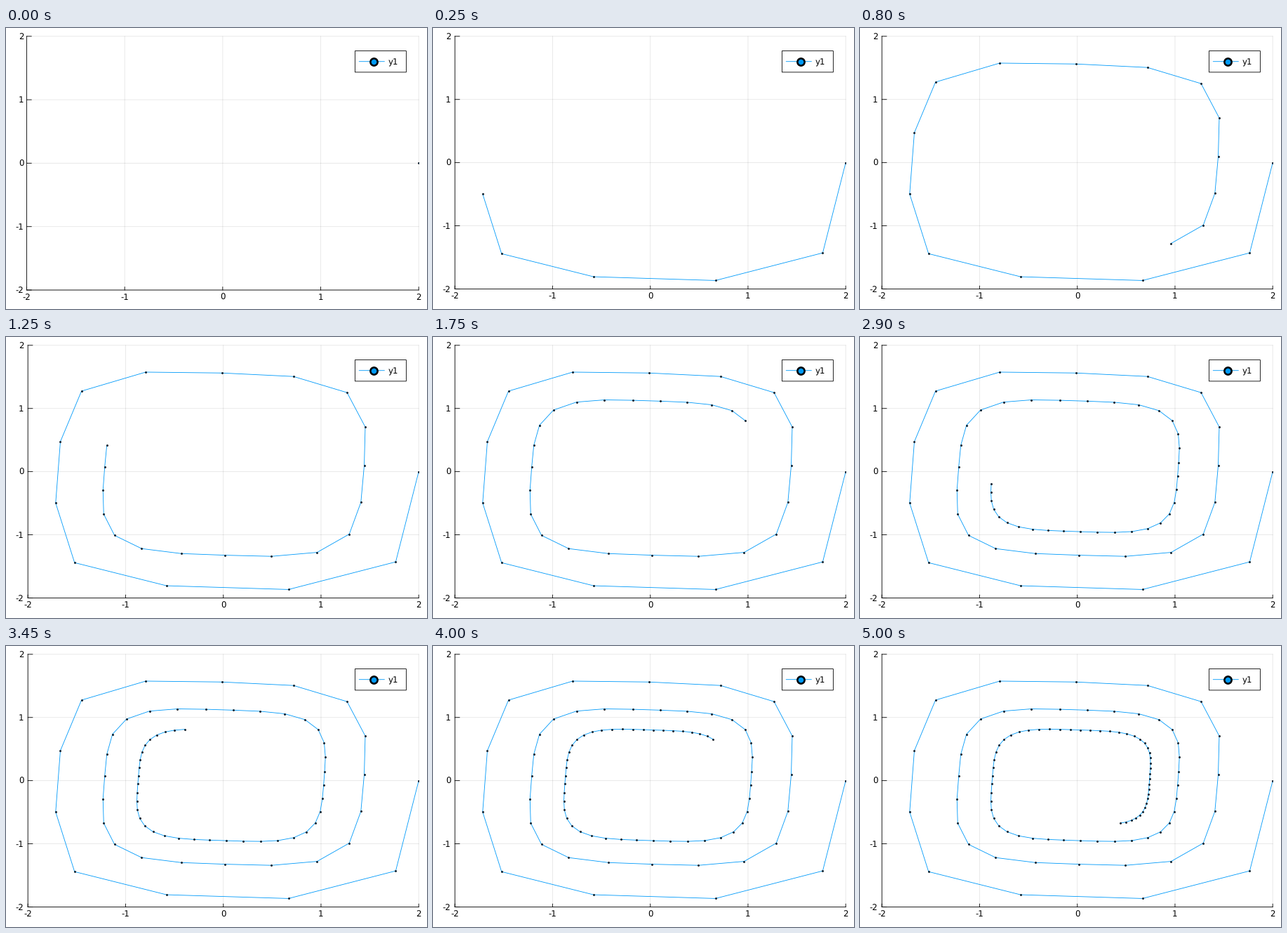
Recreate the animation shown at these times as a matplotlib script. Size 600 by 400 pixels, loop 5050 ms.

```python
import numpy as np
import matplotlib.pyplot as plt
from matplotlib.animation import FuncAnimation
from matplotlib.patches import Rectangle

W, H, DPI = 600, 400, 100
FRAMES, INTERVAL, DT = 101, 50, 0.1
BLUE = "#009AFA"
PX = 72 / DPI  # points per pixel
LW = 0.85
plt.rcParams["path.snap"] = False
plt.rcParams["text.hinting"] = "none"

# Tsit5 Runge-Kutta pair: stages, error weights, dense output
STAGES = [np.array(row) for row in (
    [0.161],
    [-0.008480655492356989, 0.335480655492357],
    [2.8971530571054935, -6.359448489975075, 4.3622954328695815],
    [5.325864828439257, -11.748883564062828, 7.4955393428898365,
     -0.09249506636175525],
    [5.86145544294642, -12.92096931784711, 8.159367898576159,
     -0.071584973281401, -0.028269050394068383],
    [0.09646076681806523, 0.01, 0.4798896504144996, 1.379008574103742,
     -3.290069515436081, 2.324710524099774],
)]
ERROR = np.array([-0.001780011052225777, -0.0008164344596567469,
                  0.007880878010261995, -0.1447110071732629,
                  0.5823571654525552, -0.45808210592918697,
                  0.015151515151515152])
DENSE = np.array([  # powers 1 to 4 of the step fraction
    [1, -2.763706197274826, 2.9132554618219126, -1.0530884977290216],
    [0, 0.1317, -0.2234, 0.1017],
    [0, 3.9302962368947516, -5.941033872131505, 2.490627285651253],
    [0, -12.411077166933676, 30.33818863028232, -16.548102889244902],
    [0, 37.50931341651104, -88.1789048947664, 47.37952196281928],
    [0, -27.896526289197286, 65.09189467479366, -34.87065786149661],
    [0, 1.5, -4, 2.5],
])
ABSTOL, RELTOL = 1e-6, 1e-3
A = np.array([[-0.1, 2.0], [-2.0, -0.1]])


def slope(u):
    return A @ u**3


def rms(v):
    return np.sqrt(np.mean(v**2))


def first_step(u):
    scale = ABSTOL + np.abs(u) * RELTOL
    f = slope(u)
    d1 = rms(f / scale)
    h = 0.01 * rms(u / scale) / d1
    d2 = rms((slope(u + h * f) - f) / scale) / h
    return min(100 * h, 10 ** (-(2 + np.log10(max(d1, d2))) / 5))


def solve():
    """Cubic spiral from (2, 0): adaptive steps, sampled every DT."""
    u, t, end = np.array([2.0, 0.0]), 0.0, (FRAMES - 1) * DT
    h, last, path = first_step(u), 1e-4, [u]
    while len(path) < FRAMES:
        h = min(h, end - t)
        ks = [slope(u)]
        for row in STAGES:
            new = u + h * (row @ np.array(ks))
            ks.append(slope(new))
        ks = np.array(ks)
        scale = ABSTOL + np.maximum(np.abs(u), np.abs(new)) * RELTOL
        err = max(rms(h * (ERROR @ ks) / scale), 1e-12)
        q = err**0.14
        if err > 1:
            h /= min(5, q / 0.9)
            continue
        while len(path) < FRAMES and len(path) * DT <= t + h + 1e-9:
            s = (len(path) * DT - t) / h
            path.append(u + h * ((DENSE @ s ** np.arange(1, 5)) @ ks))
        u, t = new, t + h
        h /= np.clip(q / last**0.08 / 0.9, 0.1, 5)
        last = max(err, 1e-4)
    return np.array(path)


PATH = solve()

fig = plt.figure(figsize=(W / DPI, H / DPI), dpi=DPI, facecolor="white")
ax = fig.add_axes([0, 0, 1, 1])
ax.set_xlim(0, W)
ax.set_ylim(H, 0)
ax.axis("off")


def line(color="black", **kw):
    return ax.plot([], [], color=color, lw=LW * PX, **kw)[0]


def label(x, y, text, ha, **kw):
    return ax.text(x, y, text, ha=ha, va="baseline", fontsize=8.5,
                   family="DejaVu Sans", color="black", **kw)


TICKS = range(-2, 3)
grid_x = [line(alpha=0.1, zorder=1) for _ in TICKS]
grid_y = [line(alpha=0.1, zorder=1) for _ in TICKS]
tick_x = [line(zorder=2) for _ in TICKS]
tick_y = [line(zorder=2) for _ in TICKS]
text_x = [label(0, 0, str(v), "center") for v in TICKS]
text_y = [label(0, 0, str(v), "right") for v in TICKS]
spine = line(zorder=2, solid_joinstyle="miter")
curve = line(BLUE, zorder=3, solid_joinstyle="round")
dots = line("none", zorder=4, marker="o", ms=1.8 * PX, mfc=BLUE,
            mec="black", mew=1.0 * PX)
clip = Rectangle((0, 0), 1, 1, transform=ax.transData)

# Legend
ax.add_patch(Rectangle((497.4, 32.6), 73, 30.3, fc="white", ec="black",
                       lw=LW * PX, zorder=6))
ax.plot([503.3, 539.3], [47.7, 47.7], color=BLUE, lw=LW * PX, zorder=7)
ax.plot([524.2], [47.7], marker="o", ms=10.2 * PX, mfc=BLUE, mec="black",
        mew=2.6 * PX, zorder=8)
label(545, 52.1, "y1", "left", zorder=8)


def layout(left, bottom, right=588.19, top=11.81):
    """Place axes, grid, ticks and labels; return the data-to-pixel maps."""
    def px(v):
        return left + (v + 2) / 4 * (right - left)

    def py(v):
        return bottom - (v + 2) / 4 * (bottom - top)

    dx, dy = 0.012 * (right - left), 0.012 * (bottom - top)
    for i, v in enumerate(TICKS):
        x, y = px(v), py(v)
        grid_x[i].set_data([x, x], [top, bottom])
        grid_y[i].set_data([left, right], [y, y])
        tick_x[i].set_data([x, x], [bottom, bottom - dy])
        tick_y[i].set_data([left, left + dx], [y, y])
        text_x[i].set_position((x, bottom + 13.9))
        text_y[i].set_position((25.3, y + 4.3))
    spine.set_data([left, left, right], [top, bottom, bottom])
    clip.set_bounds(left, top, right - left, bottom - top)
    for art in (curve, dots):
        art.set_clip_path(clip)
    return px, py


def draw(k):
    px, py = layout(29.5, 373) if k == 0 else layout(31.2, 371.5)
    pts = PATH[:k + 1]
    xs, ys = px(pts[:, 0]), py(pts[:, 1])
    curve.set_data(xs, ys)
    dots.set_data(xs, ys)
    return curve, dots


anim = FuncAnimation(fig, draw, frames=FRAMES, interval=INTERVAL,
                     init_func=lambda: draw(0), repeat=True, repeat_delay=0,
                     blit=False)
plt.show()
```
